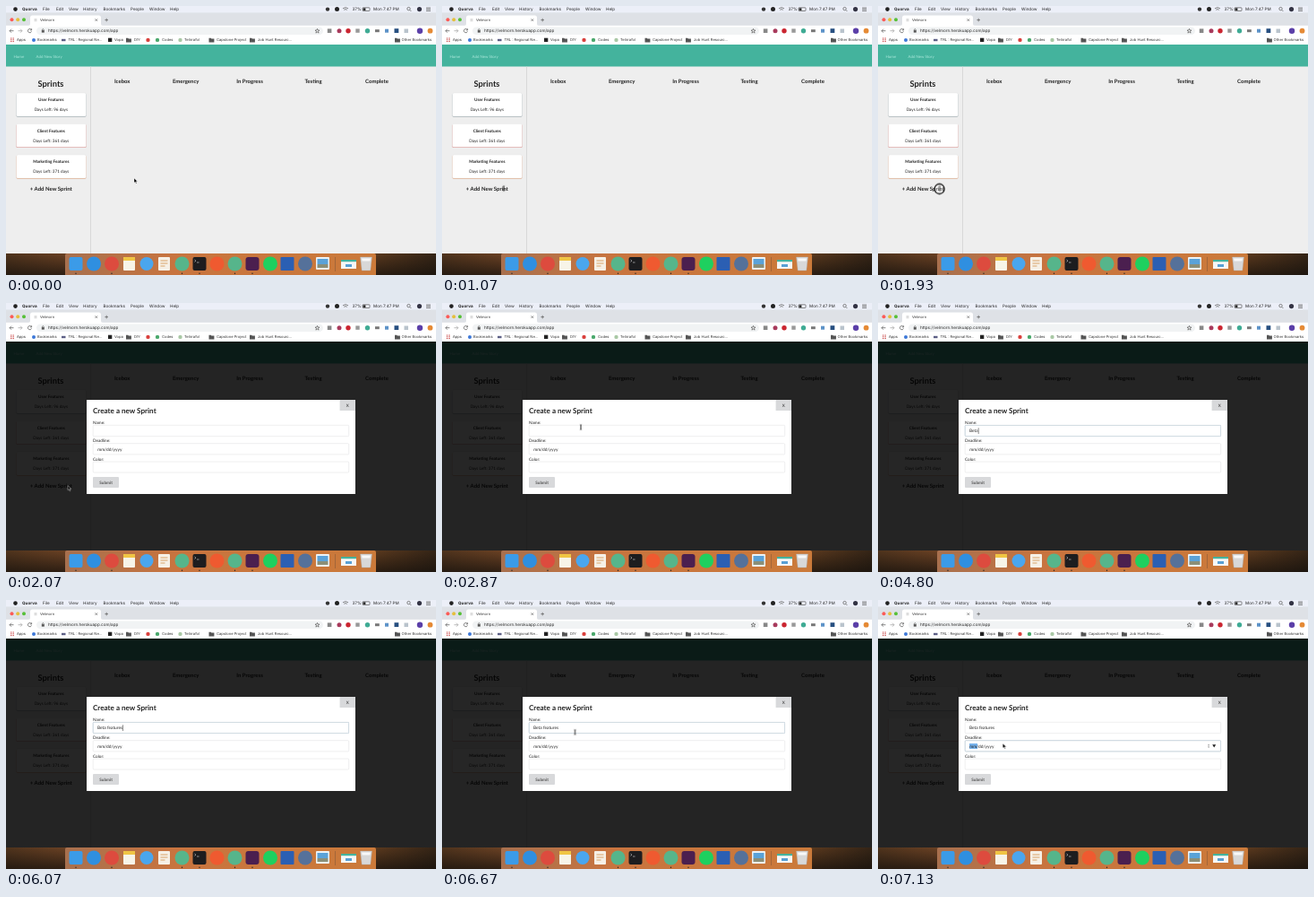
An HTML page for the animation above (8000 ms loop, 480 px wide and 300 px high).

```html
<!DOCTYPE html>
<html lang="en">
<head>
<meta charset="utf-8">
<title>Sprint board</title>
<style>
html, body { margin: 0; width: 100%; height: 100%; overflow: hidden; }
svg { display: block; width: 480px; height: 300px; text-rendering: geometricPrecision; }
text { font: 4.67px Lato, sans-serif; fill: #222; }
.ui text { font: 4.6px Inter, sans-serif; fill: #222; }
.ui .small text { font-size: 4.1px; fill: #333; }
.ui .strong { font-weight: 700; }
.mid { text-anchor: middle; }
.bold text { font-weight: 700; }
.heads text { font-size: 6px; font-weight: 700; }
.nav text { font-size: 4.4px; fill: #d9fff6; }
.line { fill: none; stroke: #666; stroke-width: .8; }
.field { fill: #fff; stroke: #dcdddf; stroke-width: .5; }
.value { font-size: 4.8px; }
.focus { fill: none; stroke: #b0c6d4; stroke-width: .6; }
.list text { font: 600 4.1px Inter, sans-serif; }

/* One shared loop; 1% is 80 ms. */
.anim { animation: 8s step-end infinite; }
.modal { animation-name: modal; }
.list { animation-name: list; }
.focus-name { animation-name: focus-name; }
.focus-date { animation-name: focus-date; }
.spin { animation-name: spin; }
.typed { animation-name: type; }
.caret { animation-name: caret; }
.mouse { animation: move 8s ease-in-out infinite; }
.arrow { animation-name: arrow; }
.beam { animation-name: beam; }
.ring { animation-name: ring; }

@keyframes modal { 0% { opacity: 0 } 25.875%, 100% { opacity: 1 } }
@keyframes list { 0% { opacity: 0 } 44.125% { opacity: 1 } 51.625%, 100% { opacity: 0 } }
@keyframes focus-name { 0% { opacity: 0 } 43.375% { opacity: 1 } 88.25%, 100% { opacity: 0 } }
@keyframes focus-date { 0% { opacity: 0 } 88.25%, 100% { opacity: 1 } }
@keyframes spin { 0% { opacity: 0 } 85%, 100% { opacity: 1 } }
@keyframes type {
  0% { transform: translateX(0) }
  51.625% { transform: translateX(3.1px) }
  58.375% { transform: translateX(5.6px) }
  59.125% { transform: translateX(7.3px) }
  60% { transform: translateX(9.7px) }
  67.5% { transform: translateX(10.6px) }
  70% { transform: translateX(12.3px) }
  70.875% { transform: translateX(14.8px) }
  71.625% { transform: translateX(17.2px) }
  72.5% { transform: translateX(18.9px) }
  73.375% { transform: translateX(21.6px) }
  75% { transform: translateX(26px) }
  75.875%, 100% { transform: translateX(28px) }
}
@keyframes caret {
  0% { opacity: 0 } 44.125% { opacity: 1 } 50% { opacity: 0 }
  51.625% { opacity: 1 } 66.625% { opacity: 0 } 67.5% { opacity: 1 }
  82.5%, 100% { opacity: 0 }
}
@keyframes move {
  0%, .4% { transform: translate(143px, 192px) }
  9.125%, 30.8% { transform: translate(69px, 203.5px) }
  35.875%, 80.1% { transform: translate(155px, 138.5px) }
  87.4%, 100% { transform: translate(139.3px, 160px) }
}
@keyframes arrow {
  0% { opacity: 1 } 7.5% { opacity: 0 } 25.875% { opacity: 1 }
  35% { opacity: 0 } 83.5%, 100% { opacity: 1 }
}
@keyframes beam {
  0% { opacity: 0 } 7.5% { opacity: 1 } 25.875% { opacity: 0 }
  35% { opacity: 1 } 51.625% { opacity: 0 } 80.875% { opacity: 1 }
  83.5%, 100% { opacity: 0 }
}
@keyframes ring {
  0% { opacity: 0 } 24.125% { opacity: 1 } 25.875% { opacity: 0 }
  43.375% { opacity: 1 } 44.125% { opacity: 0 }
  87.5% { opacity: 1 } 89.125%, 100% { opacity: 0 }
}
</style>
</head>
<body>
<svg viewBox="0 0 480 300">
  <defs>
    <linearGradient id="dusk">
      <stop offset="0" stop-color="#5a3a20"/><stop offset=".14" stop-color="#7a4a28"/>
      <stop offset=".85" stop-color="#6a4222"/><stop offset="1" stop-color="#3a2818"/>
    </linearGradient>
    <linearGradient id="shade" x2="0" y2="1">
      <stop offset="0" stop-color="#14100c" stop-opacity=".15"/>
      <stop offset="1" stop-color="#14100c" stop-opacity=".75"/>
    </linearGradient>
    <linearGradient id="dock">
      <stop offset="0" stop-color="#a8704e"/><stop offset=".35" stop-color="#c8743f"/>
      <stop offset="1" stop-color="#cb7a3a"/>
    </linearGradient>
    <path id="folder" d="M0 .6h2.2l.7.8h3v3.8H0z" fill="#555"/>
    <rect id="card" width="78" height="26" rx="1.5"/>
  </defs>

  <!-- Page -->
  <rect width="480" height="300" fill="#eee"/>
  <rect y="43" width="480" height="24.5" fill="#44b39d"/>
  <g class="nav" fill-opacity=".7">
    <text x="8.5" y="57.6">Home</text>
    <text x="33.5" y="57.6">Add New Story</text>
  </g>
  <path d="M94.5 67.5V276" stroke="#cfcfcf" stroke-width=".7"/>
  <g class="mid heads">
    <text x="50" y="89.6" style="font-size:9.33px">Sprints</text>
    <text x="129.7" y="86">Icebox</text>
    <text x="200.7" y="86">Emergency</text>
    <text x="272" y="86">In Progress</text>
    <text x="343" y="86">Testing</text>
    <text x="414" y="86">Complete</text>
    <text x="50.3" y="206">+ Add New Sprint</text>
  </g>
  <use href="#card" x="11.5" y="97.6" fill="#7f9197"/>
  <use href="#card" x="11.5" y="132.1" fill="#d0605a"/>
  <use href="#card" x="11.5" y="166.6" fill="#d98a5a"/>
  <g fill="#fff" stroke="#ddd" stroke-width=".3">
    <use href="#card" x="11.5" y="97"/>
    <use href="#card" x="11.5" y="131.5"/>
    <use href="#card" x="11.5" y="166"/>
  </g>
  <g class="mid bold">
    <text x="50.3" y="106">User Features</text>
    <text x="50.3" y="140.5">Client Features</text>
    <text x="50.3" y="175">Marketing Features</text>
  </g>
  <g class="mid">
    <text x="50.3" y="117">Days Left: 96 days</text>
    <text x="50.3" y="151.5">Days Left: 361 days</text>
    <text x="50.3" y="186">Days Left: 371 days</text>
  </g>

  <!-- Dialog -->
  <g class="anim modal">
    <rect y="43" width="480" height="233" fill-opacity=".85"/>
    <rect x="90" y="108" width="300" height="105" fill="#fff"/>
    <rect x="372.6" y="108" width="17.4" height="12" fill="#d8d9db"/>
    <text class="mid" x="381.3" y="115.8">X</text>
    <text x="97" y="122.8" style="font-size:8.1px;font-weight:700">Create a new Sprint</text>
    <text x="97" y="134.6">Name:</text>
    <text x="97" y="155">Deadline:</text>
    <text x="97" y="175.5">Color:</text>
    <rect class="field" x="97.2" y="136.3" width="285.5" height="12.4" rx="1"/>
    <rect class="field" x="97.2" y="156.7" width="285.5" height="12.2" rx="1"/>
    <rect class="field" x="97.2" y="177" width="285.5" height="12" rx="1"/>
    <rect x="97" y="194" width="29" height="12" rx="1" fill="#d8d9db"/>
    <text class="mid" x="111.6" y="201.7" style="fill:#555;font-weight:700">Submit</text>

    <text class="value" x="102" y="144.2">Beta features</text>
    <g class="anim typed">
      <rect x="102" y="138" width="32" height="9" fill="#fff"/>
      <path class="anim caret" d="M102.3 139.3V146" stroke="#111" stroke-width=".6"/>
    </g>
    <rect class="focus anim focus-name" x="97.2" y="136.3" width="285.5" height="12.4" rx="1"/>

    <g class="anim focus-date">
      <rect class="focus" x="97.2" y="156.7" width="285.5" height="12.2" rx="1"/>
      <rect x="102" y="160" width="9" height="6" fill="#76b2ec"/>
    </g>
    <text class="value" x="102.2" y="164.8">mm/dd/yyyy</text>
    <g class="anim spin">
      <path d="M368 162.3l1.1-1.5 1.1 1.5zM368 163.5l1.1 1.5 1.1-1.5z" fill="#888"/>
      <path d="M373.2 161.2h4l-2 3.2z" fill="#222"/>
    </g>

    <g class="anim list">
      <rect x="96.6" y="149.6" width="65" height="53.8" rx="1" fill="#000" fill-opacity=".13"/>
      <rect x="97" y="149.4" width="64" height="53" rx=".8" fill="#fff" stroke="#ccc" stroke-width=".3"/>
      <text x="101" y="159.4">1</text>
      <text x="101" y="171.4">Find a place for lunch</text>
      <text x="101" y="183.4">asdfadsf</text>
      <text x="101" y="195.4">asd</text>
    </g>
  </g>

  <!-- Menu bar -->
  <g class="ui">
    <rect width="480" height="8" fill="#eceff8"/>
    <circle cx="10.5" cy="3.6" r="2.3" fill="#222"/>
    <text class="strong" x="18" y="4.9">Quorva</text>
    <text x="41" y="4.9">File</text>
    <text x="56" y="4.9">Edit</text>
    <text x="70" y="4.9">View</text>
    <text x="86" y="4.9">History</text>
    <text x="108.5" y="4.9">Bookmarks</text>
    <text x="139" y="4.9">People</text>
    <text x="160" y="4.9">Window</text>
    <text x="183" y="4.9">Help</text>
    <circle cx="359" cy="3.6" r="2.2" fill="#333"/>
    <circle cx="369.5" cy="3.6" r="2.5" fill="#222"/>
    <path class="line" d="M376 2.8q3-2.4 6 0M377.3 4.3q1.7-1.4 3.4 0" stroke="#222"/>
    <text x="386.5" y="4.9">37%</text>
    <rect class="line" x="398" y="1.8" width="8" height="3.7" rx=".6"/>
    <rect x="398.6" y="2.4" width="2.8" height="2.5" fill="#222"/>
    <text x="410" y="4.9">Mon 7:47 PM</text>
    <circle class="line" cx="449.5" cy="3.1" r="1.7"/><path class="line" d="M450.8 4.4l1.6 1.6"/>
    <circle cx="461.5" cy="3.6" r="2.6" fill="#334"/>
    <path class="line" d="M469 2h5M469 3.7h5M469 5.4h5"/>
  </g>

  <!-- Browser -->
  <g class="ui">
    <rect y="7.5" width="480" height="15" fill="#dee1e6"/>
    <circle cx="6.5" cy="15.2" r="2" fill="#fc5b57"/>
    <circle cx="13.2" cy="15.2" r="2" fill="#e5bf3c"/>
    <circle cx="20" cy="15.2" r="2" fill="#57c038"/>
    <path d="M25 22q2 0 2-2v-7q0-2.5 2.5-2.5h74q2.5 0 2.5 2.5v7q0 2 2 2z" fill="#fff"/>
    <rect x="31.5" y="14" width="3" height="3.3" fill="#ddd"/>
    <g class="small"><text x="38" y="17.1">Velmorn</text></g>
    <path class="line" d="M99.6 14.4l2.4 2.4M102 14.4l-2.4 2.4M110.4 15.6h3.6M112.2 13.8v3.6"/>
    <rect y="21.8" width="480" height="21.2" fill="#fff"/>
    <rect x="34" y="23.4" width="320" height="8.6" rx="4.3" fill="#f1f3f4"/>
    <path class="line" d="M8.5 27.7H4M6 25.7l-2 2 2 2"/>
    <path class="line" d="M13.5 27.7H18M16 25.700l2 2-2 2" style="stroke:#aaa"/>
    <path class="line" d="M28.3 26.500a2.100 2.100 0 1 0 .2 1.800M28.600 25.200v1.700h-1.700"/>
    <rect x="39.8" y="27.1" width="3" height="2.5" fill="#555"/>
    <path class="line" d="M40.4 27.1v-.8q.9-1.4 1.8 0v.8"/>
    <text x="47" y="29.4">https://velmorn.herokuapp.com/app</text>
    <path class="line" d="M347.5 25.4l.7 1.700h1.800l-1.500 1.200.6 1.800-1.600-1.100-1.600 1.100.6-1.800-1.500-1.200h1.800z"/>
    <rect x="358.8" y="25.400" width="4.6" height="4.6" fill="#888"/>
    <circle cx="372" cy="27.7" r="2.5" fill="#a83a5c"/>
    <circle cx="382" cy="27.7" r="2.7" fill="#cb2530"/>
    <rect x="390.300" y="25.4" width="4.400" height="4.400" fill="#999"/>
    <circle cx="403.500" cy="27.700" r="2.700" fill="#3fab94"/>
    <rect x="412" y="26.200" width="4.800" height="3" fill="#777"/>
    <rect x="423" y="25.700" width="4" height="4" fill="#5d93c8"/>
    <rect x="433.500" y="25.200" width="4.800" height="4.800" fill="#274f80"/>
    <rect x="444.500" y="25.500" width="4.500" height="4.500" fill="#b9c3cc"/>
    <circle cx="462" cy="27.700" r="3.200" fill="#5b3fa8"/>
    <circle cx="473.500" cy="27.700" r="2.900" fill="#e58a35"/>

    <g class="small">
      <path d="M5 36h4M5 37.8h4M5 39.6h4" stroke="#c55" stroke-dasharray="1 .5"/>
      <text x="12" y="39.4">Apps</text>
      <circle cx="31" cy="37.9" r="2" fill="#3d78d8"/>
      <text x="35" y="39.4">Bookmarks</text>
      <rect x="62" y="36.8" width="4.5" height="2.4" fill="#5c5f85"/>
      <text x="69.5" y="39.4">TRL : Regional Ne...</text>
      <rect x="114" y="35.7" width="4.3" height="4.3" fill="#222"/>
      <text x="121" y="39.4">Vopa</text>
      <use href="#folder" x="134" y="35.2"/>
      <text x="143" y="39.4">DIY</text>
      <circle cx="158.5" cy="37.9" r="2.2" fill="#d9403c"/>
      <circle cx="169" cy="37.9" r="2.2" fill="#4aa86c"/>
      <text x="174" y="39.4">Codes</text>
      <circle cx="194.5" cy="37.9" r="2.2" fill="#a9c8a5"/>
      <text x="199" y="39.4">Telirrafol</text>
      <use href="#folder" x="226.500" y="35.2"/>
      <text x="235" y="39.4">Capstone Project</text>
      <use href="#folder" x="272" y="35.2"/>
      <text x="281" y="39.4">Job Hunt Resourc...</text>
      <use href="#folder" x="434" y="35.2"/>
      <text x="441.5" y="39.4">Other Bookmarks</text>
    </g>
  </g>

  <!-- Desktop and dock -->
  <rect y="276" width="480" height="24" fill="url(#dusk)"/>
  <rect y="276" width="480" height="24" fill="url(#shade)"/>
  <path d="M66 300v-22q0-2 2-2h343q2 0 2 2v22z" fill="url(#dock)"/>
  <g>
    <rect x="70.5" y="280" width="15" height="15" rx="2" fill="#3b9be8"/>
    <circle cx="98" cy="287.5" r="8" fill="#2f8fe0"/>
    <circle cx="118" cy="287.5" r="8" fill="#dd4b3e"/>
    <rect x="131" y="280" width="13" height="15" rx="1" fill="#f7f4e8"/>
    <path d="M131 280h13v4h-13z" fill="#f0c544"/>
    <circle cx="157" cy="287.5" r="7.5" fill="#4aa6ee"/>
    <rect x="170" y="280" width="13" height="15" rx="1" fill="#f6f0e6"/>
    <path d="M172.5 284h8M172.5 287h8M172.5 290h5" stroke="#d9a46a"/>
    <circle cx="196.5" cy="287.5" r="8" fill="#56b58b"/>
    <rect x="208.5" y="280" width="15" height="15" rx="2" fill="#1d1d1f"/>
    <path d="M210.5 283l1.5 1.2-1.5 1.2M213 286h2.5" fill="none" stroke="#ddd" stroke-width=".6"/>
    <circle cx="235.5" cy="287.5" r="8" fill="#ef5a30"/>
    <circle cx="255.5" cy="287.5" r="8" fill="#56b58b"/>
    <rect x="267.5" y="280" width="15" height="15" rx="3" fill="#4b1f4f"/>
    <circle cx="295" cy="287.5" r="8" fill="#1ed05f"/>
    <rect x="306.5" y="280" width="15" height="15" rx="1" fill="#2b5fb3"/>
    <circle cx="334" cy="287.5" r="8" fill="#55719a"/>
    <rect x="346" y="280" width="15" height="14" rx="1" fill="#edf2f5"/>
    <path d="M347.5 282h12v6h-12z" fill="#5aa2d8"/><path d="M347.5 288h12v4h-12z" fill="#8b8f78"/>
    <path d="M367.5 280v16" stroke="#8a5a3a" stroke-width=".6"/>
    <rect x="374" y="283" width="17" height="10" fill="#f6f6f6"/>
    <path d="M374 283h17v2.2h-17z" fill="#44b39d"/><path d="M379 288h7v3h-7z" fill="#59a0d4"/>
    <path d="M395.5 280h13l-1.700 15h-9.600z" fill="#d8d8d8" stroke="#aaa" stroke-width=".4"/>
    <path d="M397 281.500h10l-.6 3h-8.800z" fill="#f8f8f8"/>
  </g>
  <g fill="#222">
    <circle cx="78" cy="298.3" r=".7"/><circle cx="118" cy="298.3" r=".7"/>
    <circle cx="196.5" cy="298.3" r=".7"/><circle cx="216" cy="298.3" r=".7"/>
    <circle cx="255.5" cy="298.3" r=".7"/><circle cx="275" cy="298.3" r=".7"/>
  </g>

  <!-- Mouse -->
  <g class="mouse">
    <path class="anim arrow" d="M0 0v5.2l1.2-1.1.9 2 .9-.4-.9-1.9h1.7z" stroke="#fff" stroke-width=".4"/>
    <path class="anim beam" d="M-1.2-2.8q1.2 0 1.2.7v4.2q0 .7-1.2.7M1.2-2.8q-1.2 0-1.2.7v4.2q0 .7 1.2.7" fill="none" stroke="#222" stroke-width=".6"/>
    <circle class="anim ring" cx="-.4" cy=".5" r="5.5" fill="#fff" fill-opacity=".25" stroke="#111" stroke-width="1.3"/>
  </g>
</svg>
</body>
</html>
```
